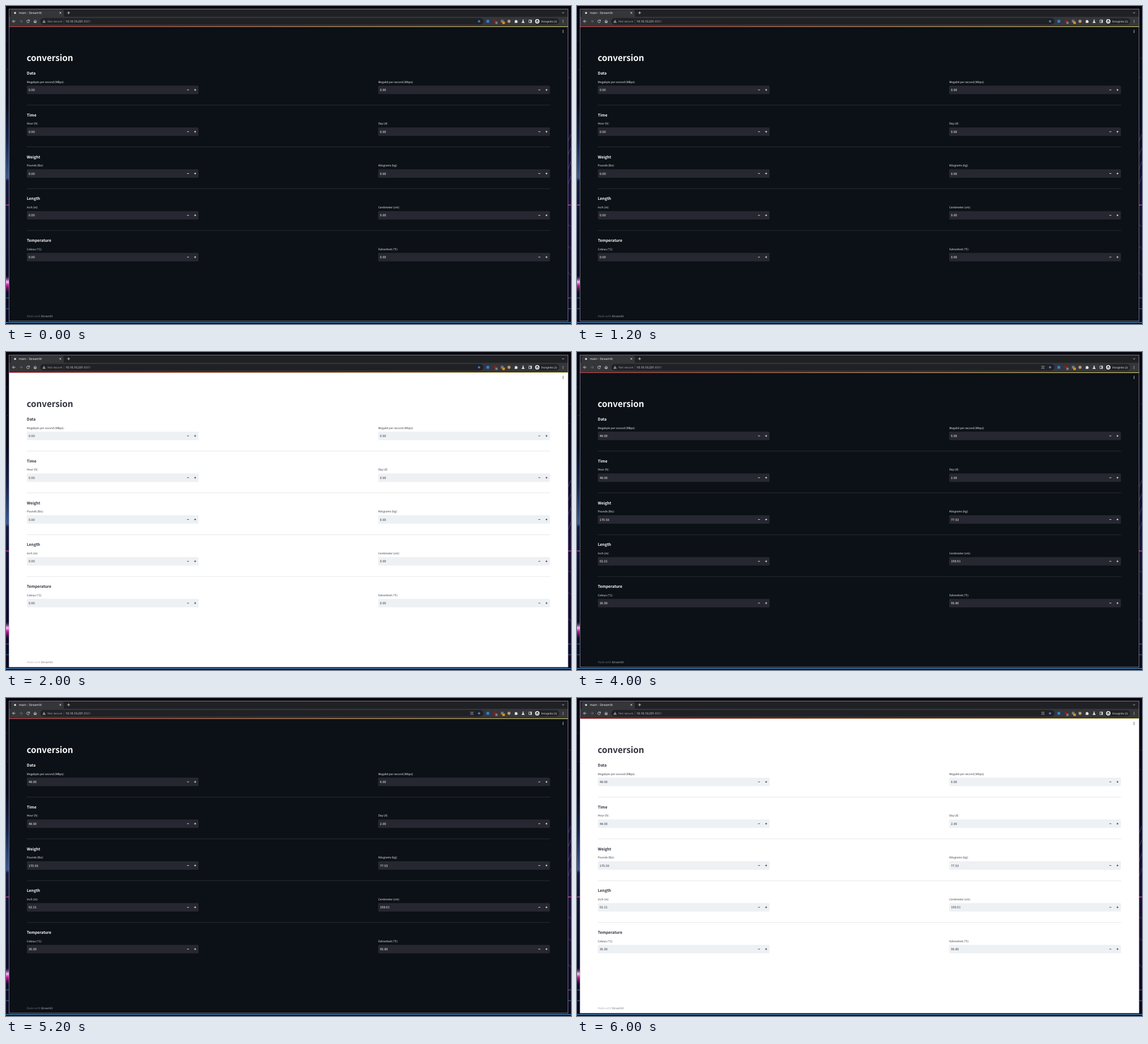
Write an HTML page that moves like this. It is 998x561 px and loops after 8 s.

```html
<!DOCTYPE html>
<html lang="en">
<head>
<meta charset="utf-8">
<title>conversion</title>
<style>
  html, body { margin: 0; width: 100%; height: 100%; overflow: hidden; background: #07071a; }
  svg { display: block; width: 100vw; height: 100vh; text-rendering: geometricPrecision; }
  #stage { --page: #0b1116; --field: #262730; --ink: #fafafa; --label: #fafafa; --rule: #3d4045; --dim: #6b6e72; --link: #b4b6b8; }
  #stage.light { --page: #fff; --field: #eef1f4; --ink: #31333f; --label: #31333f; --rule: #d6d6d9; --dim: #adadb2; --link: #6f7079; }
  .ui { font-family: "Noto Sans", "Open Sans", sans-serif; fill: #e8eaed; }
  .doc { font-family: "Noto Sans CJK JP", "Noto Sans CJK SC", "Noto Sans CJK", "Noto Sans", sans-serif; fill: var(--ink); }
  .title { font-size: 15.3px; font-weight: 700; letter-spacing: -.005em; }
  .head { font-size: 6.85px; font-weight: 600; letter-spacing: -.005em; }
  .label { font-size: 4.88px; fill: var(--label); }
  .value { font-size: 5.58px; }
  .foot { font-size: 4.88px; fill: var(--dim); }
  .foot tspan { fill: var(--link); }
  .field { fill: var(--field); }
  .rule { stroke: var(--rule); stroke-width: .6; }
  .sign { stroke: var(--ink); stroke-width: .85; fill: none; }
  .line { fill: none; stroke: #e8eaed; stroke-width: .8; }
</style>
</head>
<body>
<svg id="stage" viewBox="0 0 998 561" preserveAspectRatio="none">
  <defs>
    <linearGradient id="west" x2="0" y2="1">
      <stop offset="0" stop-color="#05050d"/>
      <stop offset=".3" stop-color="#080a1c"/>
      <stop offset=".42" stop-color="#14224a"/>
      <stop offset=".54" stop-color="#38598f"/>
      <stop offset=".55" stop-color="#141a3c"/>
      <stop offset=".7" stop-color="#0d1030"/>
      <stop offset="1" stop-color="#080920"/>
    </linearGradient>
    <linearGradient id="east" x2="0" y2="1">
      <stop offset="0" stop-color="#05050d"/>
      <stop offset=".35" stop-color="#0a0820"/>
      <stop offset=".6" stop-color="#1a0f38"/>
      <stop offset="1" stop-color="#0a0820"/>
    </linearGradient>
    <linearGradient id="glow" x2="0" y2="1">
      <stop offset="0" stop-color="#b0148c" stop-opacity="0"/>
      <stop offset=".35" stop-color="#e9c6f2"/>
      <stop offset=".55" stop-color="#d01a9c"/>
      <stop offset="1" stop-color="#6a1478" stop-opacity="0"/>
    </linearGradient>
    <linearGradient id="deco">
      <stop offset="0" stop-color="#ff4b4b"/>
      <stop offset="1" stop-color="#fffd80"/>
    </linearGradient>
  </defs>

  <!-- wallpaper -->
  <rect width="998" height="561" fill="#06060f"/>
  <rect width="6" height="561" fill="url(#west)"/>
  <rect x="992" width="6" height="561" fill="url(#east)"/>
  <rect y="556" width="998" height="5" fill="#090b20"/>
  <rect y="476" width="5" height="30" fill="url(#glow)"/>
  <g fill="none" stroke-width="1">
    <path d="M0 351H5M993 351H998" stroke="#d4389c" stroke-width="1.4"/>
    <path d="M993 238L998 226M993 262L998 250M993 288L998 274M993 314L998 300" stroke="#4a2a86"/>
    <path d="M993 386L998 389M993 424L998 428M993 470L998 475" stroke="#60227c"/>
    <path d="M0 515H5M0 534H5M993 515H998M993 534H998" stroke="#3574b0"/>
    <path d="M0 558.4H998" stroke="#4b94c8" stroke-width="1.3"/>
  </g>
  <g fill="#8a86b0"><circle cx="3" cy="112" r=".5"/><circle cx="2" cy="62" r=".4"/><circle cx="996" cy="92" r=".5"/><circle cx="995" cy="126" r=".5"/></g>

  <!-- browser window -->
  <rect x="5" y="5" width="988" height="551" fill="#202124"/>
  <path d="M6 19.2Q8.2 19.2 8.2 17V9Q8.2 6.6 10.6 6.6H99.6Q102 6.6 102 9V17Q102 19.2 104.2 19.2Z" fill="#35363a"/>
  <rect x="5" y="19" width="988" height="17" fill="#35363a"/>
  <rect x="60.5" y="21.3" width="783" height="11.4" rx="5.7" fill="#202124"/>
  <rect x="932.6" y="21.6" width="44.4" height="10.8" rx="5.4" fill="#202124"/>
  <circle cx="16" cy="12.3" r="1.7" fill="#e4e4e6"/>
  <g class="ui">
    <text x="22.7" y="14" font-size="5.45">main - Streamlit</text>
    <text x="73.2" y="28.9" font-size="5.15" style="fill:#9aa0a6">Not secure</text>
    <text x="105.2" y="28.9" font-size="5.22">10.10.10.231<tspan fill="#9aa0a6">:8501</tspan></text>
    <text x="945.4" y="28.7" font-size="4.67">Incognito (2)</text>
  </g>
  <g class="line">
    <path d="M94.5 10.6L97.5 13.6M97.5 10.6L94.5 13.6M108.2 12H113M110.6 9.6V14.4"/>
    <path d="M982.4 11.3L984 12.9L985.6 11.3"/>
    <path d="M16.6 27H11.6M14 24.5L11.5 27L14 29.5"/>
    <path d="M24 27H29M26.6 24.5L29.1 27L26.6 29.5" stroke="#77787c"/>
    <path d="M41 25.6A2.4 2.4 0 1 0 41.3 27.8M41.4 24.2V26.3H39.3"/>
    <path d="M49 27.3L51.5 24.7L54 27.3M49.8 26.8V29.4H51V27.6H52V29.4H53.2V26.8"/>
    <path d="M102.2 23.6V30.4" stroke="#5f6368" stroke-width=".5"/>
    <path d="M923.7 24.7H928.3V29.3H923.7Z"/>
    <path d="M927.3 24.7V29.3" stroke-width="1.6"/>
  </g>
  <path d="M67.2 24.3L70.1 29.4H64.3Z" fill="#9aa0a6"/>
  <path d="M67.2 26V27.6M67.2 28.2V28.8" stroke="#202124" stroke-width=".6"/>
  <path id="star" fill="#4285f4"/>
  <g id="scan" fill="none" stroke="#9aa0a6" stroke-width=".7">
    <path d="M820.7 26V24.6H822.2M823.8 24.6H825.3V26M825.3 28V29.4H823.8M822.2 29.4H820.7V28"/>
    <rect x="821.9" y="25.8" width="2.2" height="2.4"/>
  </g>

  <!-- toolbar buttons -->
  <rect x="848.7" y="24.6" width="4.8" height="4.8" fill="#2f7de0"/>
  <rect x="861.6" y="24.6" width="4.6" height="4.6" fill="#8e1b20"/>
  <rect x="864.2" y="27.4" width="4.4" height="4.4" rx=".7" fill="#6b6e72"/>
  <rect x="874" y="24.4" width="4.8" height="4.8" fill="#74777b"/>
  <rect x="876.8" y="27.4" width="4.4" height="4.4" rx=".7" fill="#f29b22"/>
  <g class="ui" font-size="3.6" text-anchor="middle"><text x="866.4" y="30.9">1</text><text x="879" y="30.9" style="fill:#2a2418">1</text></g>
  <circle cx="888.5" cy="27" r="2.7" fill="#b79a78"/>
  <g fill="#e8eaed">
    <path d="M898.5 25.4H900A.9 .9 0 0 1 901.8 25.4H903.2V26.8A.9 .9 0 0 1 903.2 28.5V29.8H898.5V28.3A.8 .8 0 0 0 898.5 26.8Z"/>
    <path d="M912.2 24.2H914.6V24.9H914.1V26.5L916 29.2Q916.2 29.8 915.5 29.8H911.3Q910.6 29.8 910.8 29.2L912.7 26.5V24.9H912.2Z"/>
    <circle cx="938.4" cy="27" r="4"/>
    <g id="dots"></g>
  </g>
  <g stroke="#35363a" fill="none" stroke-width=".6">
    <path d="M936 26.6H940.8"/>
    <path d="M937.1 26.3L937.5 24.9H939.3L939.7 26.3Z" fill="#35363a"/>
    <circle cx="937.3" cy="28.3" r=".75"/><circle cx="939.5" cy="28.3" r=".75"/>
  </g>

  <!-- page -->
  <rect x="5" y="36" width="988" height="520" fill="var(--page)"/>
  <rect x="5" y="36" width="988" height=".85" fill="url(#deco)"/>
  <g id="menu" fill="var(--ink)"></g>
  <text class="doc title" x="36.6" y="96.6">conversion</text>
  <g id="rows"></g>
  <text class="doc foot" x="36.8" y="549.3">Made with <tspan>Streamlit</tspan></text>
  <rect x="5.3" y="5.3" width="987.5" height="550.6" fill="none" stroke="#a79eb0" stroke-width=".7"/>
</svg>
<script>
const stage = document.getElementById("stage");
const LOOP = 8000, HOLD = 2000, PITCH = 73.75;
const COLUMNS = [36.8, 657.4], FIELD_W = 303.4;
const ROWS = [
  ["Data", "Megabyte per second (MBps):", "48.00", "Megabit per second (Mbps):", "6.00"],
  ["Time", "Hour (h):", "48.00", "Day (d):", "2.00"],
  ["Weight", "Pounds (lbs):", "170.93", "Kilograms (kg):", "77.53"],
  ["Length", "Inch (in):", "62.21", "Centimeter (cm):", "158.01"],
  ["Temperature", "Celsius (°C):", "36.00", "Fahrenheit (°F):", "96.80"]
];

function add(parent, tag, attrs, text) {
  const el = document.createElementNS("http://www.w3.org/2000/svg", tag);
  for (const k in attrs) el.setAttribute(k, attrs[k]);
  if (text) el.textContent = text;
  parent.appendChild(el);
  return el;
}

function dots(id, x, y, gap, r) {
  const g = document.getElementById(id);
  for (const k of [-1, 0, 1]) add(g, "circle", { cx: x, cy: y + k * gap, r });
}

const cells = [];

function addField(g, x, y, label, value) {
  add(g, "text", { class: "doc label", x, y: y + 135.7 }, label);
  add(g, "rect", { class: "field", x, y: y + 140.6, width: FIELD_W, height: 14.8, rx: 1.6 });
  const el = add(g, "text", { class: "doc value", x: x + 3.1, y: y + 150.2 }, "0.00");
  cells.push({ el, value });
  const minus = x + 284.7, plus = x + 297.3, mid = y + 148;
  add(g, "path", {
    class: "sign",
    d: `M${minus - 1.7} ${mid}h3.4M${plus - 1.7} ${mid}h3.4M${plus} ${mid - 1.7}v3.4`
  });
}

const rows = document.getElementById("rows");
ROWS.forEach(([head, left, a, right, b], i) => {
  const y = i * PITCH;
  add(rows, "text", { class: "doc head", x: 36.8, y: y + 121.2 }, head);
  addField(rows, COLUMNS[0], y, left, a);
  addField(rows, COLUMNS[1], y, right, b);
  if (i < ROWS.length - 1) add(rows, "path", { class: "rule", d: `M36.8 ${y + 174.8}H961` });
});

dots("dots", 984, 27, 1.9, 0.62);
dots("menu", 984, 44.8, 1.9, 0.7);

const star = Array.from({ length: 10 }, (_, i) => {
  const r = i % 2 ? 1.25 : 3, a = i * Math.PI / 5;
  return `${(835.6 + r * Math.sin(a)).toFixed(2)} ${(27.1 - r * Math.cos(a)).toFixed(2)}`;
});
document.getElementById("star").setAttribute("d", `M${star.join("L")}Z`);

const scan = document.getElementById("scan");
let shown = -1;

function show(step) {
  if (step === shown) return;
  shown = step;
  const filled = step >= 2;
  stage.classList.toggle("light", step % 2 === 1);
  scan.style.display = filled ? "" : "none";
  for (const { el, value } of cells) el.textContent = filled ? value : "0.00";
}

const start = performance.now();
function tick() {
  show(Math.floor(((performance.now() - start) % LOOP) / HOLD));
  requestAnimationFrame(tick);
}
tick();
</script>
</body>
</html>
```
